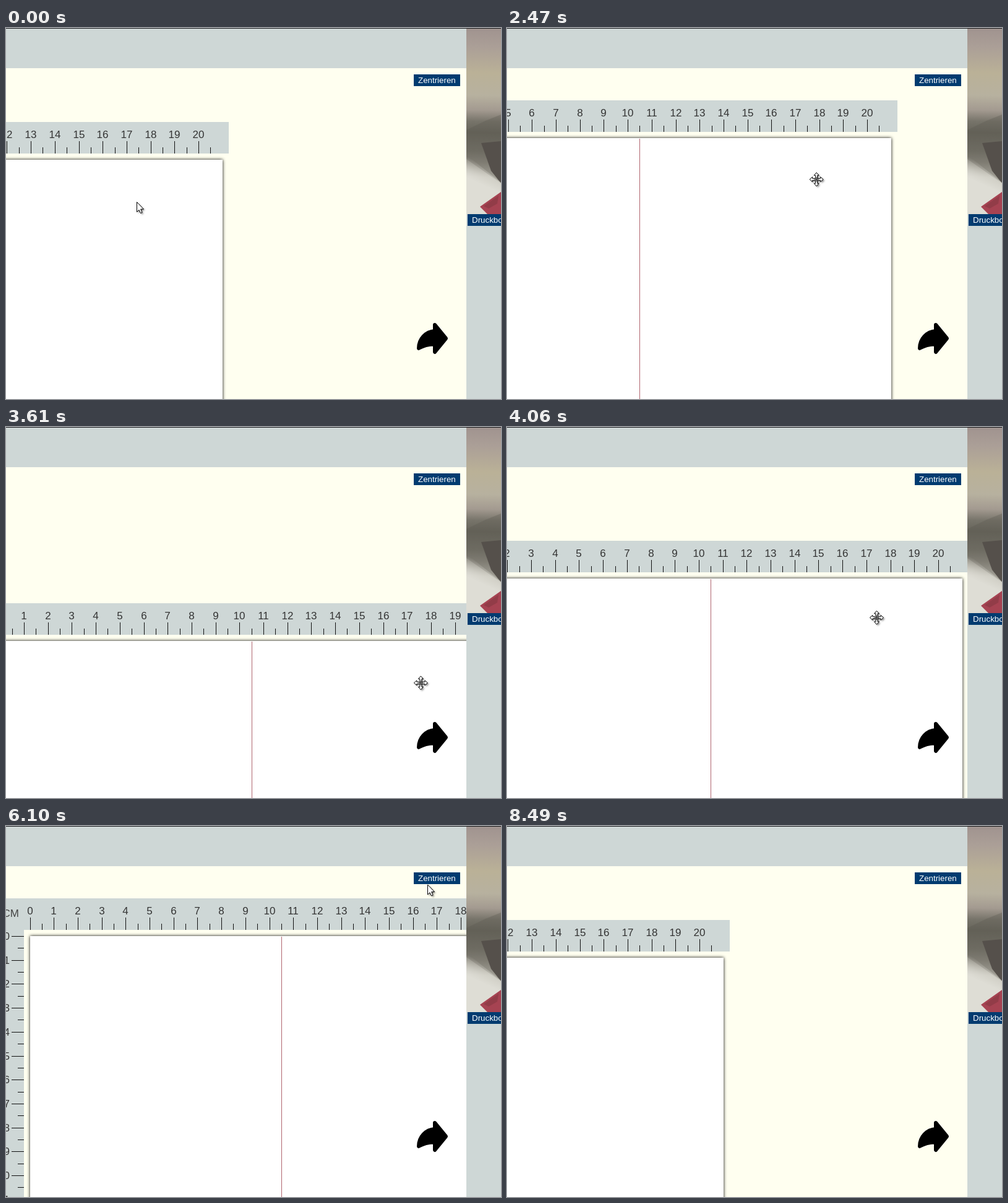
Animation of 800 by 600 pixels, one loop 9.09 s. Source, as an HTML page with a canvas:

```html
<!DOCTYPE html>
<html lang="de">
<head>
<meta charset="utf-8">
<style>
html, body { margin: 0; width: 100%; height: 100%; overflow: hidden; }
canvas { display: block; }
</style>
</head>
<body>
<canvas id="stage" width="800" height="600"></canvas>
<script>
const ctx = document.getElementById('stage').getContext('2d');
const LOOP = 9090, CM = 38.7;
const GREY = '#ced7d6', IVORY = '#fffff0', NAVY = '#003b70';
const FONT = '"Liberation Sans", Arial, sans-serif';
const HOME = [-463, 213], DRAGGED = [38.5, 178];
const CENTER_START = 7290, CENTER_TIME = 1060;

// [time, x, y]
const pageKeys = [
  [1180, ...HOME], [1500, -448, 214], [1870, -405, 210], [2110, -316, 196],
  [2350, -215, 174], [2650, -165, 195], [3010, -101, 274], [3200, -50, 330],
  [3450, -5, 358], [3700, -15, 335], [3970, -62, 274], [4060, -77, 245],
  [4300, -84, 205], [4550, -40, 184], [4840, 20, 182], [5180, ...DRAGGED]
];
const cursorKeys = [
  [950, 211, 281], [1050, 214, 281], [1210, 214, 281], [1870, 300.5, 273.5],
  [2110, 389, 258], [2350, 475, 236], [2650, 530, 275], [3010, 586.5, 371.5],
  [3200, 640, 408], [3450, 675, 428], [3700, 665, 400], [3970, 611, 332],
  [4060, 597.5, 308.5], [4300, 595, 270], [4550, 645, 251], [4840, 702, 249],
  [5180, 719, 249], [5510, 719, 249], [6100, 681, 94.5], [6400, 684, 82],
  [6550, 664, 78], [6750, 705, 80], [6950, 680, 87], [8220, 680, 87], [8460, 741, 98]
];

// Smooth interpolation that never overshoots a key.
function track(keys, t) {
  const last = keys.length - 1;
  if (t <= keys[0][0]) return keys[0].slice(1);
  if (t >= keys[last][0]) return keys[last].slice(1);
  let i = 0;
  while (t >= keys[i + 1][0]) i++;
  const span = keys[i + 1][0] - keys[i][0], u = (t - keys[i][0]) / span;
  return [1, 2].map(axis => {
    const slope = n => (keys[n + 1][axis] - keys[n][axis]) / (keys[n + 1][0] - keys[n][0]);
    const tangent = n => {
      if (n === 0 || n === last) return 0;
      const a = slope(n - 1), b = slope(n);
      return a * b > 0 ? 2 * a * b / (a + b) : 0;
    };
    const a = keys[i][axis], b = keys[i + 1][axis];
    return a + (b - a) * u * u * (3 - 2 * u)
      + span * u * (1 - u) * (tangent(i) * (1 - u) - tangent(i + 1) * u);
  });
}

function pageAt(t) {
  if (t < CENTER_START) return track(pageKeys, t);
  const u = Math.min(1, (t - CENTER_START) / CENTER_TIME);
  const k = 0.5 - Math.cos(Math.PI * u) / 2;
  return DRAGGED.map((v, i) => v + (HOME[i] - v) * k);
}

function rect(color, x, y, w, h) {
  ctx.fillStyle = color;
  ctx.fillRect(x, y, w, h);
}

function text(str, x, y, size, color, align = 'left') {
  ctx.font = `${size}px ${FONT}`;
  ctx.textAlign = align;
  ctx.fillStyle = color;
  ctx.fillText(str, x, y);
}

function polygon(points, color) {
  ctx.beginPath();
  points.forEach(([x, y]) => ctx.lineTo(x, y));
  ctx.closePath();
  ctx.fillStyle = color;
  ctx.fill();
}

function drawRulers(px, py) {
  const x = Math.round(px), y = Math.round(py);
  rect(GREY, x - 61, y - 61, 884, 51);
  rect(GREY, x - 61, y - 61, 51, 1220);
  text('CM', x - 18, y - 31, 17, '#444', 'right');
  for (let half = 0; half <= 59; half++) {
    const major = half % 2 === 0, length = major ? 20 : 10;
    const tx = Math.round(px + half * CM / 2), ty = Math.round(py + half * CM / 2);
    if (half <= 41) {
      rect('#111', tx, y - 10 - length, 1, length);
      if (major) text(half / 2, tx, y - 35, 17, '#333', 'center');
    }
    rect('#111', x - 10 - length, ty, length, 1);
    if (major) text(half / 2, x - 33, ty + 6, 17, '#333', 'right');
  }
}

function drawPage(px, py, t) {
  const x = Math.round(px), y = Math.round(py);
  ctx.save();
  ctx.shadowColor = '#000';
  ctx.shadowBlur = 5;
  rect('#fff', x, y, 813, 1149);
  ctx.restore();
  const color = t >= CENTER_START ? '#dd5ab8' : '#b0646f';
  rect(color, Math.round(px + 10.5 * CM), y + 1, 1, 1147);
}

function drawShareArrow() {
  ctx.beginPath();
  ctx.moveTo(693, 480);
  ctx.lineTo(711, 502);
  ctx.lineTo(693, 524);
  ctx.lineTo(693, 511.5);
  ctx.bezierCurveTo(685, 511, 676, 513, 667, 518);
  ctx.bezierCurveTo(667, 503, 678, 491, 693, 490);
  ctx.closePath();
  ctx.fillStyle = ctx.strokeStyle = '#000';
  ctx.lineWidth = 6;
  ctx.lineJoin = 'round';
  ctx.fill();
  ctx.stroke();
}

function drawButton(hover) {
  rect(hover ? '#2b2b33' : NAVY, 659, 75, 75, 19);
  if (hover) rect('#e3e8f0', 660, 76, 73, 17);
  text('Zentrieren', 666, 89, 13.333, hover ? '#2f5c9c' : '#fff');
}

function drawSidebar() {
  rect(GREY, 744, 0, 56, 600);
  ctx.save();
  ctx.beginPath();
  ctx.rect(744, 1, 56, 300);
  ctx.clip();
  const shade = ctx.createLinearGradient(750, 0, 744, 301);
  [[0, '#a0938f'], [0.1, '#ab9f97'], [0.24, '#bab197'], [0.36, '#b7b19f'],
   [0.44, '#a39a90'], [0.5, '#77746a'], [0.56, '#66645a'], [0.66, '#77756b'],
   [0.72, '#918e84'], [0.8, '#c6c4ba']].forEach(([at, c]) => shade.addColorStop(at, c));
  rect(shade, 744, 0, 56, 301);
  polygon([[744, 212], [800, 251], [800, 140], [775, 150], [744, 165]], 'rgba(92,90,80,.35)');
  polygon([[768, 186], [800, 183], [800, 251], [784, 231]], '#55504b');
  const table = ctx.createLinearGradient(775, 222, 762, 250);
  table.addColorStop(0, 'rgba(222,221,213,0)');
  table.addColorStop(1, '#deddd5');
  polygon([[744, 205], [800, 250], [800, 301], [744, 301]], table);
  polygon([[766, 289], [800, 265], [800, 301], [778, 301]], '#a64352');
  polygon([[772, 288], [796, 271], [794, 284], [780, 292]], '#923c48');
  ctx.restore();
  rect(NAVY, 746, 301, 54, 19);
  text('Druckbogen', 753, 315, 13.333, '#fff');
}

const arrowShape = [[0.5, 0.5], [0.5, 16.5], [4, 13.2], [6.5, 18.5], [9, 17.5], [6.7, 12], [11.5, 12]];
const arm = [[-1.5, -1.5], [-1.5, -6.5], [-4, -6.5], [0, -11], [4, -6.5], [1.5, -6.5]];
const moveShape = [0, 1, 2, 3].flatMap(turn => arm.map(([x, y]) => {
  for (let i = 0; i < turn; i++) [x, y] = [-y, x];
  return [x, y];
}));

function drawCursor(x, y, moving) {
  ctx.save();
  ctx.translate(x, y);
  ctx.shadowColor = 'rgba(0,0,0,.5)';
  ctx.shadowBlur = 3;
  ctx.shadowOffsetX = ctx.shadowOffsetY = 2;
  polygon(moving ? moveShape : arrowShape, '#fff');
  ctx.shadowColor = 'transparent';
  ctx.lineWidth = 1;
  ctx.lineJoin = 'miter';
  ctx.strokeStyle = '#000';
  ctx.stroke();
  if (moving) {
    rect('#000', -0.5, -3.5, 1, 7);
    rect('#000', -3.5, -0.5, 7, 1);
  }
  ctx.restore();
}

function draw(t) {
  const [px, py] = pageAt(t), [cx, cy] = track(cursorKeys, t);
  const visible = t < 8490;
  const hover = visible && cx >= 659 && cx < 734 && cy >= 75 && cy < 94;
  rect(IVORY, 0, 0, 800, 600);
  drawRulers(px, py);
  drawPage(px, py, t);
  rect(GREY, 0, 0, 800, 65);
  drawButton(hover);
  drawShareArrow();
  drawSidebar();
  rect('#15171a', 0, 0, 800, 1);
  if (visible) drawCursor(cx, cy, t >= 160 && cy > py);
}

const start = performance.now();
function tick() {
  draw((performance.now() - start) % LOOP);
  requestAnimationFrame(tick);
}
tick();
</script>
</body>
</html>
```
